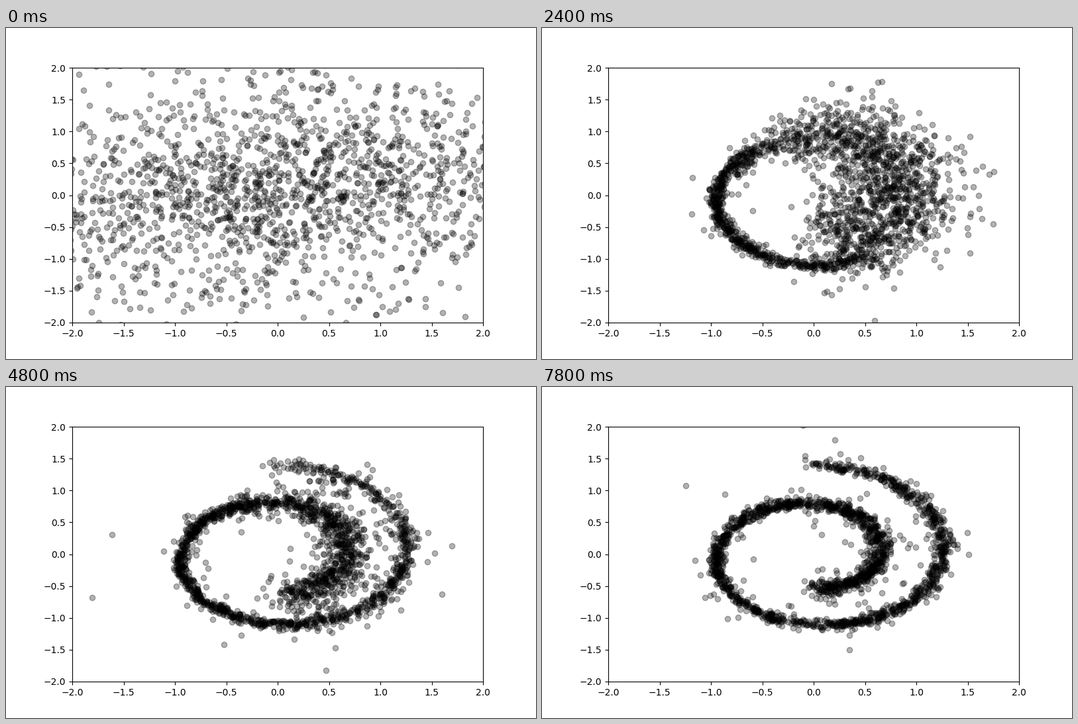
Recreate the animation shown at these times as a matplotlib script. Size 800 by 500 pixels, loop 8000 ms.

```python
import numpy as np
import matplotlib.pyplot as plt
from matplotlib.animation import FuncAnimation

FRAMES, STEP_MS, COUNT = 40, 200, 2000


def step(x, width):
    """Smooth switch from 0 to 1 around x = 0."""
    return 1 / (1 + np.exp(-x / width))


def untrained(rng):
    x = rng.normal(0, 1.5, COUNT)
    wide = rng.random(COUNT) < 0.38
    y = 0.08 + 0.14 * x + rng.normal(0, 1, COUNT) * np.where(wide, 1.7, 0.7)
    return x, y


def roll(rng, frame):
    # Training progress: noise dies early, the two right-hand arms part later.
    noise = 0.036 + 0.4 * np.exp(-0.45 * frame)
    smear = 0.03 + 0.95 * step(21 - frame, 2)
    inner = 0.05 + 0.38 * step(20 - frame, 3)
    tip = 0.08 + 0.25 * step(29 - frame, 3)
    stray = int(3 + 12 * step(frame - 20, 2))

    t = 1.5 * np.pi * (1 + 2 * rng.random(COUNT))
    near = step(8.1 - t, 0.32)
    far = np.clip((t - 11.1) / 0.9, 0, 1)
    end = step(t - 13.6, 0.15)
    chance = smear + (1 - smear) * end * min(1, 1.6 * smear)
    blurred = far * (rng.random(COUNT) < chance)

    # Radial drift, in units of the gap between neighbouring turns.
    drift = inner * near * rng.normal(0.55, 1, COUNT)
    drift += tip * step(5.3 - t, 0.25) * rng.exponential(1, COUNT)
    drift -= blurred * rng.normal(0.4, 0.4, COUNT)

    swing = 0.35 * inner * near + 0.15 * blurred
    angle = t + swing * rng.normal(0, 1, COUNT)
    past = np.clip(angle - 4.5 * np.pi, 0, None)
    r = np.abs(0.1 * t + 0.2 * np.pi * (drift - 0.9 * past))

    spread = noise * (1 + 0.3 * far) + 0.2 * inner * near + 0.08 * blurred
    loose = rng.random(COUNT) < 0.07
    spread += loose * (0.1 + 0.3 * np.exp(-0.2 * frame))
    x = r * np.cos(angle) + spread * rng.normal(0, 1, COUNT)
    y = r * np.sin(angle) + spread * rng.normal(0, 1, COUNT)

    x[:stray], y[:stray] = rng.normal(0, 1.05, (2, stray))
    return x, y


fig, ax = plt.subplots(figsize=(8, 5), dpi=100)
ax.set_xlim(-2, 2)
ax.set_ylim(-2, 2)
dots, = ax.plot([], [], "ko", alpha=0.3)


def draw(frame):
    rng = np.random.default_rng(700 + frame)
    dots.set_data(*(roll(rng, frame) if frame else untrained(rng)))
    return dots,


anim = FuncAnimation(fig, draw, frames=FRAMES, interval=STEP_MS,
                     repeat=True, repeat_delay=0)
plt.show()
```
